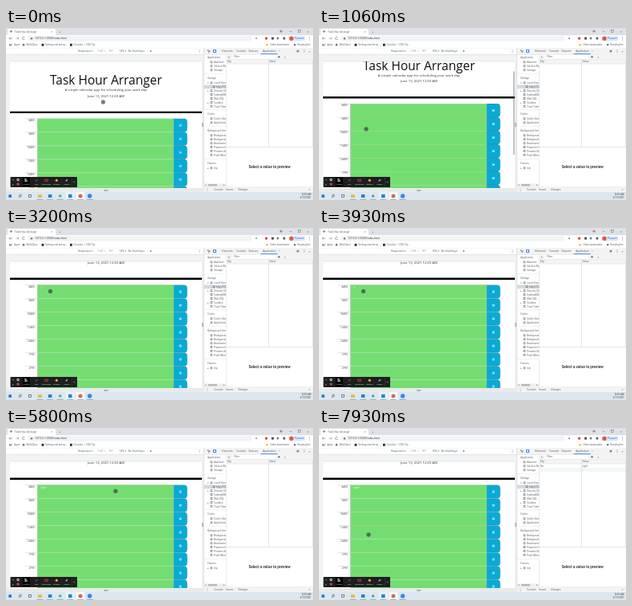
These frames come from a looping animation (384x216 px, 8000 ms). An HTML page with a canvas:

```html
<!DOCTYPE html>
<html lang="en">
<head>
<meta charset="utf-8">
<title>Task Hour Arranger</title>
<style>
html, body { margin: 0; width: 100%; height: 100%; overflow: hidden; background: #fff; }
canvas { display: block; width: 384px; height: 216px; }
</style>
</head>
<body>
<canvas id="stage" width="384" height="216"></canvas>
<script>
const g = document.getElementById('stage').getContext('2d');
const LOOP = 8000, INK = '#63686d', LINE = '#d3d7db';
const UI = 'Roboto, sans-serif', PAGE = '"Open Sans", sans-serif';

// Each key is [time, ...values]; values ease between neighbouring keys.
const pointerKeys = [
  [0, 121.5, 93], [400, 121.5, 93], [930, 59, 127], [1260, 59, 127],
  [1660, 55, 99], [1850, 55, 99], [2330, 55.5, 79.5], [5400, 55.5, 79.5],
  [6200, 218, 79], [6500, 218, 79], [6730, 200, 84.5], [7660, 62, 134], [LOOP, 62, 134]
];
const scrollKeys = [[0, 0], [860, 0], [1060, 18.7], [1460, 42.2], [LOOP, 42.2]];
const typingTimes = [3660, 3860, 4060, 4260, 4400];
const SAVED_AT = 6460;

function track(keys, t) {
  const i = Math.max(1, keys.findIndex(k => k[0] > t));
  const a = keys[i - 1], b = keys[i];
  const u = (t - a[0]) / (b[0] - a[0]), e = u * u * (3 - 2 * u);
  return a.slice(1).map((v, n) => v + (b[n + 1] - v) * e);
}
function box(x, y, w, h, color, radius = 0) {
  g.fillStyle = color;
  g.beginPath();
  g.roundRect(x, y, w, h, radius);
  g.fill();
}
function dot(x, y, r, color) {
  g.fillStyle = color;
  g.beginPath();
  g.arc(x, y, r, 0, 7);
  g.fill();
}
function path(points, color = '#62676c', width = .6) {
  g.strokeStyle = color;
  g.lineWidth = width;
  g.beginPath();
  points.forEach(([x, y]) => g.lineTo(x, y));
  g.stroke();
}
function text(s, x, y, size = 3.2, color = INK, align = 'left', family = UI, weight = 400) {
  g.font = `${weight} ${size}px ${family}`;
  g.fillStyle = color;
  g.textAlign = align;
  g.fillText(s, x, y);
}
function chevron(x, y, s = 1.2, dir = 1) {
  path([[x + s * dir, y - s], [x, y], [x + s * dir, y + s]]);
}

function page(scroll, px, py, note, caret, scrolling) {
  g.save();
  g.beginPath();
  g.rect(5, 42, 240, 159);
  g.clip();
  box(5, 42, 240, 159, '#fff');
  g.translate(0, -scroll);
  text('Task Hour Arranger', 125, 71.3, 15.5, '#111', 'center', PAGE);
  text('A simple calendar app for scheduling your work day', 125, 79.3, 4.25, '#333', 'center', PAGE);
  text('June 13, 2021 12:03 AM', 125, 87.2, 4.25, '#333', 'center', PAGE);
  box(5, 104.8, 240, 2.3, '#000');
  const hours = ['8AM', '9AM', '10AM', '11AM', '12AM', '1PM', '2PM', '3PM', '4PM', '5PM'];
  hours.forEach((hour, i) => {
    const y = 113.7 + 17 * i, my = py + scroll;
    const inRow = my > y && my < y + 17;
    box(24, y, 16, .4, '#c4c4c4');
    text(hour, 35.5, y + 3.2, 3.4, '#444', 'right', PAGE);
    box(39.6, y, 170, 17, '#74dd72');
    box(39.6, y, 170, .5, inRow && px > 40 && px < 210 ? '#b9b978' : '#a5e4a1');
    box(39.4, y, .4, 17, '#6fa96f');
    box(209.6, y, 17, 17, '#43899a', [0, 4, 4, 0]);
    box(209.9, y + .4, 16.4, 16.2, inRow && px > 210 ? '#0796ba' : '#08abd4', [0, 3.7, 3.7, 0]);
    box(216.7, y + 7, 2.9, 2.9, '#a9e0f0', .4);
    box(217.4, y + 7.4, 1.5, .7, '#08abd4');
  });
  text(note + (caret ? '|' : ''), 43, 118.4, 3.6, '#e6ffe6', 'left', PAGE);
  g.restore();
  if (scrolling) box(243, 42 + scroll * .66, 1.6, 105, 'rgba(110,110,110,.5)', .8);
}

function browser() {
  box(0, 0, 384, 9, '#dee1e6');
  box(2, 1, 60, 8, '#fff', [2, 2, 0, 0]);
  dot(6.3, 4.3, 1.4, '#8a9096');
  text('Task Hour Arranger', 11, 5.6, 3.2);
  text('×', 56.5, 5.7, 3.6);
  text('+', 66, 6, 4);
  dot(344, 4, 1.6, '#8b9096');
  box(354.5, 4, 3, .5, INK);
  g.strokeStyle = INK;
  g.lineWidth = .5;
  g.strokeRect(365.5, 2.6, 2.6, 2.6);
  text('×', 376.5, 5.7, 4.4);

  box(0, 9, 384, 16, '#fff');
  path([[4, 13], [8, 13]]); chevron(4, 13, 1.4);
  path([[12, 13], [16, 13]], '#aaa'); chevron(16, 13, 1.4, -1);
  g.beginPath(); g.arc(22, 13, 1.7, .4, 5.6); g.stroke();
  box(27, 10, 280, 6.5, '#f1f3f4', 3.2);
  dot(32, 13.2, 1.2, '#777');
  text('127.0.0.1:5500/index.html', 36, 14.4, 3.4, '#444');
  dot(313, 13, 1.1, '#8a9095');
  box(324, 11.6, 3, 3, '#d84a42', .5);
  box(332, 11.6, 3, 3, '#50555a', .5);
  dot(340, 13, 1.4, '#73787d');
  box(346.5, 11.5, 2.8, 3, '#60656a', .4);
  box(353.5, 10, 21, 6.4, '#dfeafb', 3.2);
  dot(357, 13.2, 2.6, '#e1573c');
  text('Paused', 361, 14.4, 3.4, '#3a6fcb');
  [11, 13, 15].forEach(y => dot(379.5, y, .45, '#555'));

  [['#de5246', 4], ['#3fa64c', 5.3], ['#4285f4', 6.6]].forEach(([c, x]) => box(x, 20, .9, 2.6, c));
  text('Apps', 10, 22.4);
  dot(22, 21.2, 1.4, '#777');
  text('WebClass', 25.5, 22.4);
  box(44.5, 19.8, 2.8, 2.8, '#222');
  text('Getting started wi...', 49, 22.4);
  box(80, 19.8, 2.8, 2.8, '#222');
  text('On rules — CSS Tip...', 84.5, 22.4);
  box(325, 19.9, 3, 2.4, '#f1c84f', .4);
  text('Other bookmarks', 330.5, 22.4, 3.1);
  box(360, 19.9, 2.4, 2.4, '#757a80', .4);
  text('Reading list', 364.5, 22.4, 3.1);
  box(0, 25, 384, .5, LINE);
}

function deviceFrame() {
  box(0, 25.4, 247, 181, '#f2f3f4');
  box(0, 25.4, 247, 7.6, '#fff');
  text('Responsive ▾', 90, 30.3);
  text('1349', 115, 30.3, 2.8, '#999');
  text('×', 123, 30.3, 2.8, '#999');
  text('897', 129, 30.3, 2.8, '#999');
  text('50% ▾', 142, 30.3);
  text('No throttling ▾', 153, 30.3);
  dot(181, 29, 1.1, '#8b9196');
  [27.5, 29, 30.5].forEach(y => dot(242, y, .4, '#555'));
  box(0, 33, 247, .4, LINE);
  box(5, 41.5, 240, .5, '#d4d7da');
  box(245, 42, 2, 159, '#eceef0');
  box(0, 201, 247, 5, '#e8eaec');
  [203, 204.2].forEach(y => box(122.5, y, 5, .5, '#777'));
  box(245.5, 119, .4, 5, '#666');
  box(246.5, 119, .4, 5, '#666');
}

function devtools(saved) {
  box(247, 25.4, 137, 181, '#fff');
  box(247, 25.4, 137, 7.6, '#f3f3f3');
  box(247, 25.4, .5, 181, '#c4c8cb');
  path([[254, 31], [252, 27.5], [255.5, 29], [254, 29.5], [254, 31]]);
  box(259, 27, 4, 4, '#2574dd', .5);
  box(259.9, 27.8, 2.2, 2.4, '#fff');
  [['Elements', 270], ['Console', 288], ['Sources', 303.5], ['Application', 321], ['»', 341]]
    .forEach(([s, x]) => text(s, x, 30.3, 3.3));
  box(318.5, 32.2, 21, .8, '#2875e2');
  dot(365, 29, 1.5, '#6a6f75');
  dot(365, 29, .6, '#f3f3f3');
  [27.7, 29, 30.3].forEach(y => dot(373, y, .45, '#555'));
  text('×', 378.5, 30.5, 4.2);
  box(247, 33, 137, .4, LINE);

  g.save();
  g.beginPath();
  g.rect(248, 33.4, 27.3, 166);
  g.clip();
  const groups = [
    ['Application', 38, 'Manifest', 'Service Workers', 'Storage'],
    ['Storage', 64, 'Local Storage', 'http://127.0.0.1', 'Session Storage', 'IndexedDB', 'Web SQL', 'Cookies', 'Trust Tokens'],
    ['Cache', 109, 'Cache Storage', 'Application Cache'],
    ['Background Services', 130, 'Background Fetch', 'Background Sync', 'Notifications', 'Payment Handler', 'Periodic Background', 'Push Messaging'],
    ['Frames', 171, 'top']
  ];
  box(248, 71.5, 28, 4.8, '#d5d9de');
  groups.forEach(([title, y, ...items], n) => {
    if (n) box(248, y - 6.5, 28, .4, '#e4e7e9');
    text(title, 252, y, 3.2);
    items.forEach((item, i) => {
      const iy = y + 6 + i * 4.95, indent = item.startsWith('http') ? 3 : 0;
      g.strokeStyle = '#64696e';
      g.lineWidth = .6;
      g.strokeRect(256 + indent, iy - 2.2, 1.9, 2.1);
      if (/Local|Session|Cookies|top/.test(item)) text(item[0] === 'L' ? '▾' : '▸', 252, iy, 2.8);
      text(item, 260 + indent, iy, 3.2);
    });
  });
  g.restore();
  box(248, 195.3, 27, 4, '#eeeeee');
  box(253, 196, 11, 2.5, '#b7babd');
  text('◂', 249, 198.4, 3);
  text('▸', 272, 198.4, 3);
  box(275.3, 33.4, .5, 166, LINE);

  box(275.8, 33.4, 108.2, 6, '#f5f5f5');
  text('↻', 277.5, 37.6, 3.6);
  box(283, 34, 53, 4.8, '#fff');
  text('Filter', 285, 37.4, 3.1);
  dot(341.5, 36.2, 1.2, '#777');
  text('×', 348, 37.6, 3.8);
  box(275.8, 39.3, 108.2, .4, LINE);
  box(275.8, 39.7, 108.2, 5.1, '#f4f4f4');
  text('Key', 276.7, 43.3);
  text('Value', 329.5, 43.3);
  box(275.8, 44.8, 108.2, .4, LINE);
  if (saved) {
    box(275.8, 50, 108.2, 4.9, '#f2f6fc');
    text('8m', 276.7, 48.5);
    text('right', 329.5, 48.5);
  }
  box(328, 39.7, .5, 109.7, '#c9cdd1');
  box(383, 39.7, .5, 109.7, '#d5d8db');
  box(275.8, 149.2, 108.2, .5, '#c8cccf');
  text('Select a value to preview', 329.5, 175.8, 4.7, '#3c3f42', 'center', UI, 700);

  box(247.5, 199.4, 136.5, 6.6, '#f3f3f3');
  box(247.5, 199.4, 136.5, .4, LINE);
  [201.7, 203, 204.3].forEach(y => dot(252, y, .4, '#555'));
  [['Console', 260], ['Issues', 275], ['Changes', 290]].forEach(([s, x]) => text(s, x, 204));
  text('×', 378.5, 204.2, 3.8);
}

function recorder() {
  box(5.5, 187, 83.5, 13, '#1d1e20', .8);
  dot(15, 190.6, 1.6, '#f4f4f4');
  dot(15, 190.6, .8, '#333');
  dot(15, 196, 1.6, '#d9533e');
  text('×', 8, 192, 3.5, '#ddd');
  text('▾', 8, 198, 3, '#ddd');
  box(20.5, 187.7, 9.5, 11.6, '#050506', .8);
  path([[24, 189], [24, 193], [25, 192.2], [26.5, 192.2], [24, 189]], '#fff', .8);
  path([[36.8, 192.6], [39.3, 190]], '#ef5753', 1);
  g.strokeStyle = '#ed4545';
  g.lineWidth = .7;
  g.strokeRect(48.8, 190.2, 3.4, 2.3);
  dot(63.3, 191.3, 1.6, '#efa53f');
  path([[74.7, 192.2], [77, 190.4]], '#e49bb0', 1.4);
  [['Mouse', 25.3], ['Pen', 38], ['Rectangle', 50.5], ['Stickers', 63.3], ['Eraser', 76]]
    .forEach(([s, x]) => text(s, x, 197.1, 2.5, '#e4e4e4', 'center'));
  box(82, 188, .4, 11.5, '#444');
  path([[86, 192.5], [85, 193.5], [86, 194.5]], '#ddd');
}

function taskbar() {
  box(0, 206, 384, 10, '#dce7ef');
  box(3.3, 209.3, 3.6, 3.6, '#1f78c8');
  g.strokeStyle = '#444';
  g.lineWidth = .6;
  g.beginPath(); g.arc(18, 210.6, 1.4, 0, 7); g.stroke();
  path([[17, 211.6], [15.9, 213]], '#444');
  g.strokeRect(28.5, 209.6, 2.8, 2.8);
  box(75, 206, 11, 10, '#eaf2f7');
  box(87.5, 206, 11, 10, '#f5f9fc');
  box(40, 209.2, 4.8, 3.8, '#eab83f', .4);
  box(52.8, 209, 4.6, 4, '#2684c8', .5);
  dot(67.7, 211, 1.8, '#57a994');
  box(78, 208.7, 4.6, 4.6, '#2487cb', .4);
  dot(93, 211, 2.5, '#d9694a');
  dot(104.7, 211, 2.7, '#3d86ea');
  [42.4, 55, 67.7, 80.3, 93, 104.7].forEach(x => box(x - 4, 215.2, 8, .8, '#77a9cc'));
  text('12:03 AM', 381.5, 210, 2.9, '#444', 'right');
  text('6/13/2021', 381.5, 214.2, 2.9, '#444', 'right');
}

function draw(now) {
  const t = now % LOOP;
  const [px, py] = track(pointerKeys, t);
  const [scroll] = track(scrollKeys, t);
  const note = 'right'.slice(0, typingTimes.filter(k => t >= k).length);
  const caret = t > 3200 && t < 6260 && t % 1060 < 400;
  g.clearRect(0, 0, 384, 216);
  browser();
  deviceFrame();
  page(scroll, px, py, note, caret, t > 860 && t < 1660);
  devtools(t >= SAVED_AT);
  recorder();
  taskbar();
  dot(px, py, 2.7, 'rgba(55,60,62,.6)');
  dot(px, py, 1.6, 'rgba(55,60,62,.3)');
  requestAnimationFrame(draw);
}
requestAnimationFrame(draw);
</script>
</body>
</html>
```
